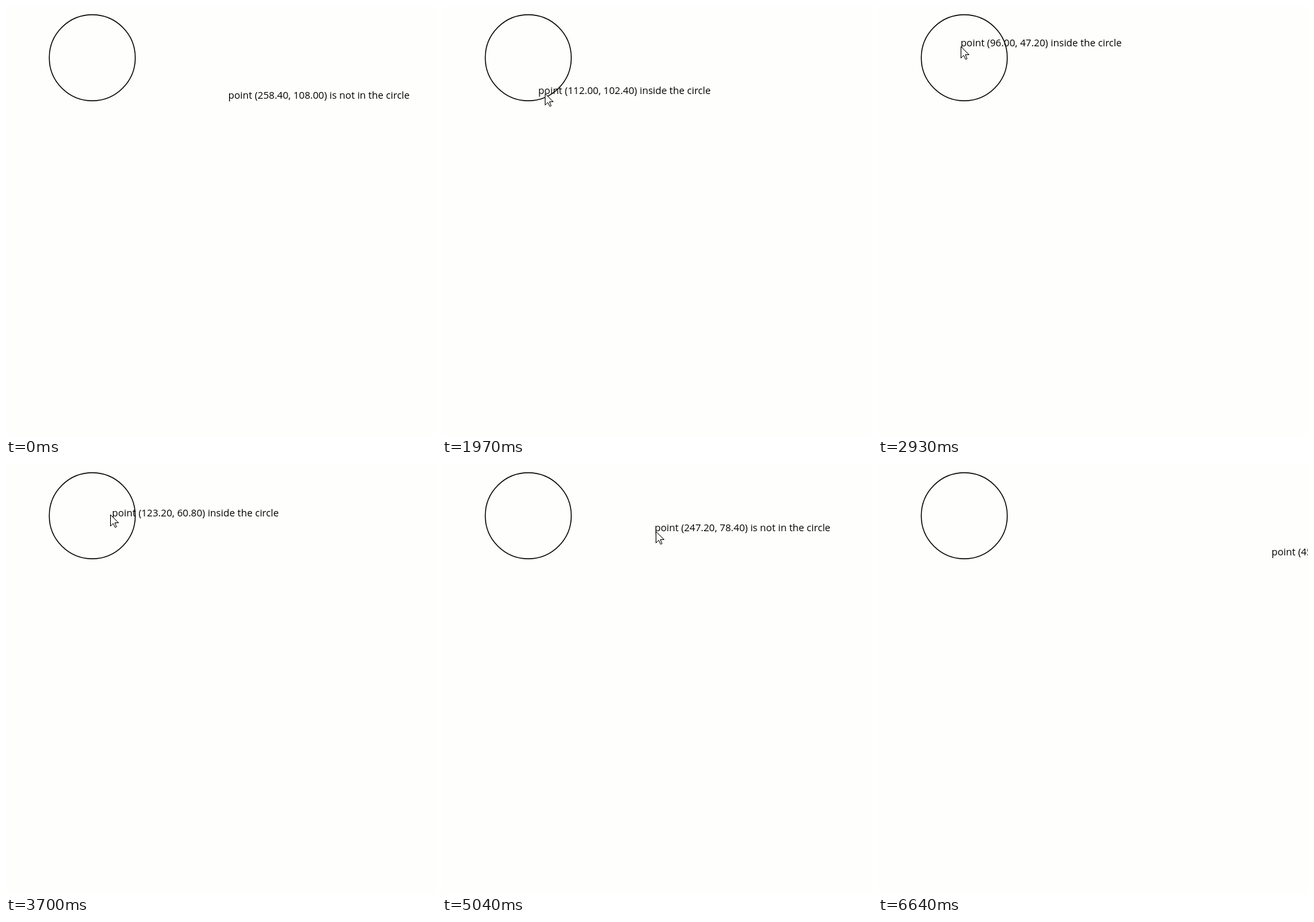
These frames come from a looping animation (640 px wide and 640 px high, 6.68 s). An HTML page with a canvas:

```html
<!DOCTYPE html>
<html lang="en">
<head>
<meta charset="utf-8">
<title>Point in circle</title>
<style>
  html, body { margin: 0; width: 100%; height: 100%; overflow: hidden; background: #fefefc; }
  canvas { display: block; width: 640px; height: 640px; }
</style>
</head>
<body>
<canvas id="stage" width="640" height="640"></canvas>
<script>
const ctx = document.getElementById('stage').getContext('2d');
const LOOP = 6680;
const STEP = 100 / 3;       // ms between picture updates
const SCALE = 1.28;         // stage pixels per user unit
const GRID = 0.8;           // pointer resolution in user units
const CIRCLE = { x: 100, y: 60, r: 50 };
const REST = { x: 258.4 * SCALE, y: 108 * SCALE };
const ENTER = 28, LEAVE = 183;

// key points of the pointer path: [step, x, y]
const PATH = [
  [ENTER, 645, 165], [41, 432, 250], [54, 125, 140], [58, 143.4, 131.1],
  [59, 153, 130], [62, 165, 131], [70, 150, 84], [80, 127, 65],
  [88, 122.5, 60], [94, 121.5, 59.5], [103, 147, 99], [110, 158, 78],
  [120, 112, 52], [129, 104.4, 65.5], [130, 105.5, 72], [138, 60, 131],
  [142, 120, 143], [150, 316.4, 100.4], [151, 318, 100], [165, 326, 137],
  [174, 420, 214], [LEAVE, 585.7, 136.2], [LEAVE + 2, 650, 100]
];

function slope(i, axis) {
  const a = PATH[Math.max(i - 1, 0)];
  const b = PATH[Math.min(i + 1, PATH.length - 1)];
  return (b[axis] - a[axis]) / (b[0] - a[0]);
}

// cubic Hermite interpolation along the path
function pointerAt(k) {
  let i = 0;
  while (i < PATH.length - 2 && PATH[i + 1][0] <= k) i++;
  const a = PATH[i], b = PATH[i + 1], span = b[0] - a[0];
  const u = (k - a[0]) / span, v = 1 - u;
  const mix = axis =>
    v * v * (1 + 2 * u) * a[axis] + u * u * (3 - 2 * u) * b[axis] +
    span * u * v * (v * slope(i, axis) - u * slope(i + 1, axis));
  return { x: mix(1), y: mix(2) };
}

function drawCircle() {
  ctx.beginPath();
  ctx.arc(CIRCLE.x * SCALE + 0.4, CIRCLE.y * SCALE + 0.2, CIRCLE.r * SCALE, 0, 2 * Math.PI);
  ctx.lineWidth = 1.4;
  ctx.strokeStyle = '#000';
  ctx.stroke();
}

function drawLabel(p) {
  const snap = n => Math.round(n / SCALE / GRID) * GRID;
  const x = snap(p.x), y = snap(p.y);
  const inside = Math.hypot(x - CIRCLE.x, y - CIRCLE.y) < CIRCLE.r;
  const state = inside ? 'inside the circle' : 'is not in the circle';
  ctx.font = '14.65px "Open Sans", "Noto Sans", sans-serif';
  ctx.fillStyle = '#000';
  ctx.fillText(`point (${x.toFixed(2)}, ${y.toFixed(2)}) ${state}`, x * SCALE, Math.round(y * SCALE));
}

function drawCursor(p) {
  const arrow = [[0, 0], [0, 17], [4, 13], [7, 19], [9, 18], [6.5, 12], [12, 12]];
  ctx.save();
  ctx.translate(Math.round(p.x) + 0.5, Math.round(p.y) + 0.5);
  ctx.beginPath();
  for (const [x, y] of arrow) ctx.lineTo(x, y);
  ctx.closePath();
  ctx.fillStyle = '#fff';
  ctx.fill();
  ctx.lineWidth = 1;
  ctx.strokeStyle = '#000';
  ctx.stroke();
  ctx.restore();
}

function draw(ms) {
  const k = Math.floor((ms + 4) / STEP);
  ctx.fillStyle = '#fefefc';
  ctx.fillRect(0, 0, 640, 640);
  drawCircle();
  // the label trails the pointer by one step
  drawLabel(k <= ENTER + 1 ? REST : pointerAt(Math.min(k - 1, LEAVE)));
  if (k >= ENTER && k < LEAVE + 2) drawCursor(pointerAt(k));
}

const start = performance.now();
function tick() {
  draw((performance.now() - start) % LOOP);
  requestAnimationFrame(tick);
}
tick();
</script>
</body>
</html>
```
